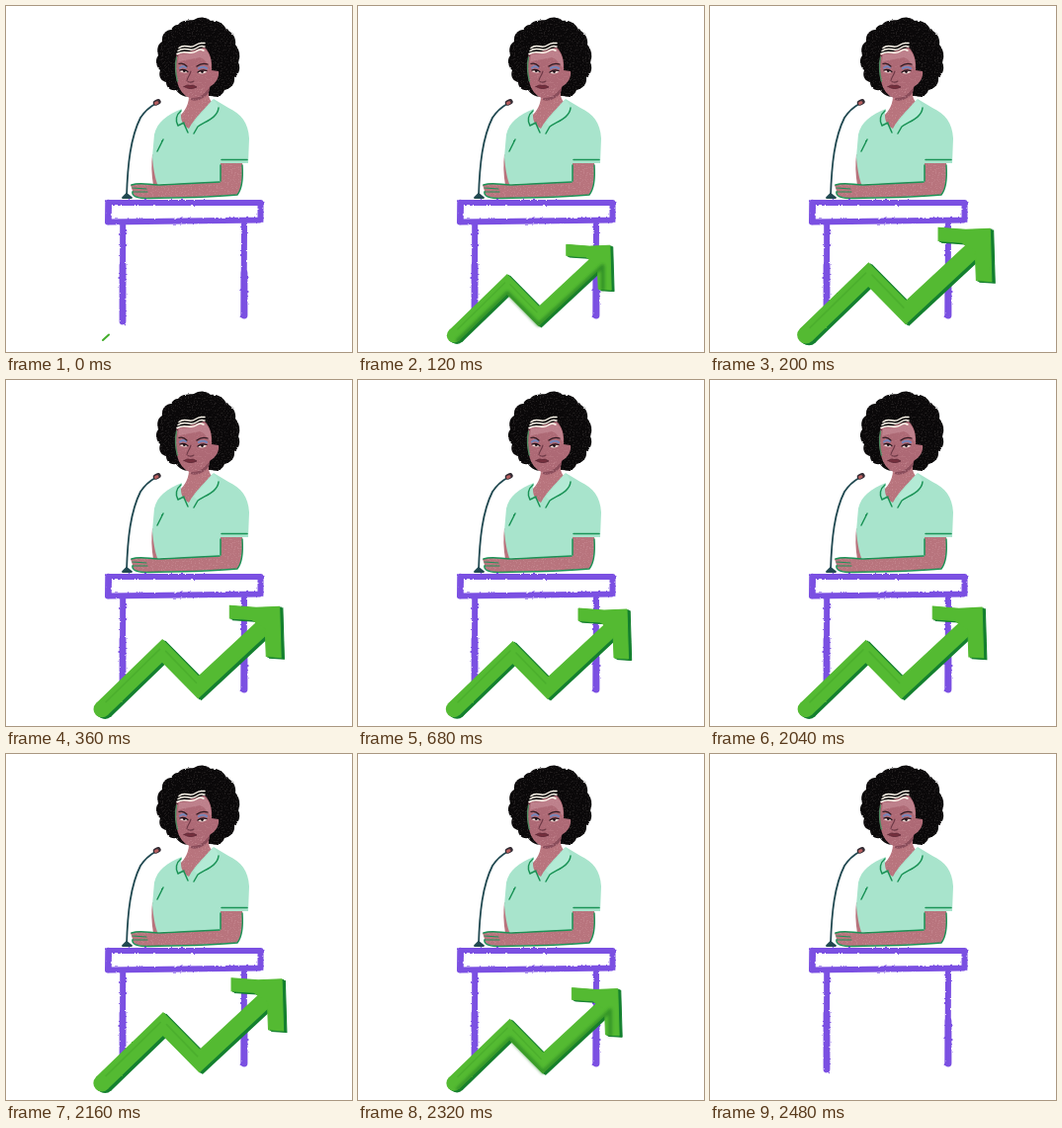
An HTML page that plays this animation: 350x350 px, repeating every 2.68 s.

```html
<!DOCTYPE html>
<html lang="en">
<head>
<meta charset="utf-8">
<title>Speaker with rising arrow</title>
<style>
html, body { margin: 0; width: 100%; height: 100%; overflow: hidden; background: #fff; }
svg { display: block; width: 100%; height: 100%; }
.line { fill: none; stroke-linecap: round; stroke-linejoin: round; }
</style>
</head>
<body>
<svg viewBox="0 0 350 350">
  <defs>
    <filter id="rough" filterUnits="userSpaceOnUse" x="0" y="0" width="350" height="350" color-interpolation-filters="sRGB">
      <feTurbulence type="fractalNoise" baseFrequency=".3" numOctaves="2" seed="4" result="n"/>
      <feDisplacementMap in="SourceGraphic" in2="n" scale="2.4" xChannelSelector="R" yChannelSelector="G"/>
    </filter>
    <filter id="soft" filterUnits="userSpaceOnUse" x="0" y="0" width="350" height="350" color-interpolation-filters="sRGB">
      <feTurbulence type="fractalNoise" baseFrequency=".25" numOctaves="2" seed="9" result="n"/>
      <feDisplacementMap in="SourceGraphic" in2="n" scale="1.4" xChannelSelector="R" yChannelSelector="G"/>
    </filter>
    <!-- keeps only scattered specks of the shape it is applied to -->
    <filter id="grain" filterUnits="userSpaceOnUse" x="0" y="0" width="350" height="350" color-interpolation-filters="sRGB">
      <feTurbulence type="fractalNoise" baseFrequency=".7" numOctaves="2" seed="2"/>
      <feColorMatrix values="0 0 0 0 0  0 0 0 0 0  0 0 0 0 0  7 0 0 0 -3.9" result="n"/>
      <feComposite in="SourceGraphic" in2="n" operator="in"/>
    </filter>
    <filter id="blur" filterUnits="userSpaceOnUse" x="60" y="200" width="260" height="150"><feGaussianBlur stdDeviation="1.8"/></filter>
    <path id="hair" d="M174 19C179 13 186 15 190 14C196 10 203 11 207 15C215 14 221 19 223 24C230 27 233 33 232 39C237 45 237 52 235 57C238 63 235 70 231 72C232 80 226 84 221 85C219 91 213 93 208 91L186 91C180 93 175 89 172 85C166 86 162 82 162 77C156 76 154 70 156 65C151 60 151 54 154 50C152 44 154 38 158 36C157 29 162 24 167 24C168 21 171 19 174 19Z"/>
    <path id="neck" d="M185 86L206 82C204 90 205 94 209 98L186 126C181 124 176 119 175 112C181 106 186 100 185 86Z"/>
    <path id="face" d="M173 48C171 57 171 68 173 76C175 85 180 91 186 93C194 95 202 89 207 81C213 78 216 71 215 66L208 65C209 55 206 46 201 42C191 44 181 48 173 48Z"/>
    <path id="arm" d="M217 158H239C240 174 239 186 234 191C205 193 165 194 140 194C131 194 127 191 128 187L126 181C135 178 145 181 155 181L216 177Z"/>
  </defs>

  <use href="#hair" fill="#0a0809" filter="url(#rough)"/>
  <use href="#hair" fill="#453f3f" filter="url(#grain)" opacity=".4"/>

  <g filter="url(#soft)">
    <g fill="#b8747d">
      <use href="#neck"/>
      <use href="#face" fill="#ad6975"/>
      <path d="M148 150L153 153V181H149C147 170 147 160 148 150Z"/>
      <use href="#arm"/>
    </g>
    <path d="M187 93C195 94 202 88 206 82L205 88C199 95 192 97 187 95Z" fill="#8a4d5b"/>
    <path d="M175 49C185 49 194 46 200 43C207 48 208 56 207 63C203 57 200 53 196 52C188 54 181 54 174 57Z" fill="#c9909a" opacity=".6"/>
    <path d="M172.5 52C171 60 171.5 69 173.5 76" class="line" stroke="#4d8a60" stroke-width="1.4"/>
  </g>
  <g fill="#d39aa2" filter="url(#grain)" opacity=".4">
    <use href="#neck"/><use href="#arm"/><use href="#face" opacity=".5"/>
  </g>

  <g class="line" stroke="#fff9ee" stroke-width="1.5">
    <path d="M175 42.5C181 37 185 44 191 40S197 38 201 37.5"/>
    <path d="M174 45.5C181 40 186 47 192 43S198 41 201 41"/>
    <path d="M173 48.5C181 43.5 186 50 192 46S198 45 200 45"/>
  </g>
  <g class="line">
    <path d="M176 62.5Q179 60 182 62M195 63Q199 60.5 203 63" stroke="#7885b8" stroke-width="2.2"/>
    <path d="M175 58.5Q179 57 183 61M193 61Q198 57 204 59" stroke="#321a22" stroke-width="1.3"/>
    <path d="M177 66Q179 67 183 66.5M195 67Q198 68.5 202 66.5" stroke="#eeded9" stroke-width="1.5"/>
    <path d="M176 65Q180 63 184 66.5M194 67Q198 63.5 203 65.5" stroke="#21131a" stroke-width="1.2"/>
    <path d="M187 66C186 70 183 73 183 75.5M184 76.5Q187 78 190 76" stroke="#6d3946" stroke-width="1.1"/>
    <path d="M180 81.5Q184 79 186 80.5Q189 79 193 82Q186 85.5 180 81.5Z" fill="#742f3d" stroke="#5c2735" stroke-width=".8"/>
  </g>
  <circle cx="180.3" cy="65.8" r="1.3" fill="#1c1017"/>
  <circle cx="198.5" cy="66.6" r="1.3" fill="#1c1017"/>

  <g filter="url(#soft)">
    <path d="M178 104C163 110 153 117 150 130L148 153C149 165 151 174 153 180L217 178V159H245L246 134C245 118 238 109 225 103L210 94L206 98C199 106 191 113 185 124C179 121 175 115 178 104Z" fill="#a8e4cc"/>
    <path d="M209 95C213 97 216 101 214 106C210 114 201 117 194 122L190 118C196 110 202 104 209 95Z" fill="#b3ead5"/>
    <g class="line" stroke="#1a9356" stroke-width="1.5">
      <path d="M177 106C172 110 171 116 174 121L180 118M180 119L184 128M215 103C214 113 203 116 194 122L190 129"/>
      <path d="M153 147L159 135M218 155.5H244M217 161V177"/>
      <path d="M127 181C136 178 145 181 155 181L216 178" stroke-width="1.6"/>
      <path d="M239 161C240 175 238 186 234 191C205 194 165 194 140 194.5C132 194 127 192 128 188" stroke-width="1.4"/>
      <path d="M128 184L142 185M128 188L143 188" stroke-width="1.1"/>
    </g>
  </g>

  <g class="line" stroke="#214951" stroke-width="1.8" filter="url(#soft)">
    <path d="M122 193C123 160 126 133 136 113Q142 104 151 99"/>
    <path d="M118 194L122 190L127 194Z" fill="#214951"/>
    <path d="M151.5 98L154 96.8" stroke="#352c34" stroke-width="5.4"/>
    <path d="M151.5 98.4L153 97.7" stroke="#b85f60" stroke-width="3"/>
  </g>

  <g class="line" stroke="#7b50e2" filter="url(#rough)">
    <path d="M118.2 221L118 319M241 221L240.5 313" stroke-width="6"/>
    <path d="M118 262V319M241 270V313" stroke-width="6.8"/>
    <path d="M104 199L257.5 199L257.5 216.5L103 218.5Z" fill="#fff" stroke-width="6"/>
    <path d="M103.5 199V218" stroke-width="6.5"/>
  </g>

  <g id="arrow">
    <g filter="url(#soft)">
      <g fill="#14802f" stroke="#14802f">
        <use href="#shape" transform="translate(1.6 .8)"/>
        <use href="#shape" transform="translate(3.2 1.6)"/>
      </g>
      <g fill="#54ba32" stroke="#54ba32">
        <g id="shape">
          <path d="M97 333L156.5 275.5L192 311.5L264 244.5" fill="none" stroke-width="16.4" stroke-miterlimit="4"/>
          <circle cx="97" cy="333" r="8.2" stroke="none"/>
          <path d="M223 231L249 233L272 232L273.5 282L259 281L258 254L245 245L223 243.5Z" stroke-width="1"/>
        </g>
      </g>
      <path d="M101 326L154 274M160 276L190 307" class="line" stroke="#47a92a" stroke-width="1.6" opacity=".6"/>
    </g>
    <path id="bevel" d="M101 339L157 285L192 321L264 255V281" class="line" stroke="#237f20" stroke-width="4" filter="url(#blur)"/>
  </g>
  <path id="spark" d="M98 338L104 332.5" class="line" stroke="#43ad2b" stroke-width="2"/>
</svg>

<script>
const LOOP = 2680, STEP = 40, RISE = 200, SETTLE = 680, EXIT_END = 2452;
const PEAK = 1.065, START = 0.04, ANCHOR = [99, 335];
const [arrow, bevel, spark] = ["arrow", "bevel", "spark"].map(id => document.getElementById(id));

// Quick growth past full size, then a slow return to it.
function sizeAt(t) {
  if (t < RISE) return PEAK - (PEAK - START) * (1 - t / RISE) ** 2;
  if (t < SETTLE) return 1 + (PEAK - 1) * (1 - (t - RISE) / (SETTLE - RISE)) ** 2.2;
  return 1;
}

function draw(time) {
  const now = Math.floor((time % LOOP) / STEP) * STEP;
  const t = Math.min(now, EXIT_END - now);
  const [x, y] = ANCHOR;
  arrow.style.display = now > 0 && t >= 0 ? "" : "none";
  spark.style.display = now === 0 ? "" : "none";
  arrow.setAttribute("transform", `translate(${x} ${y}) scale(${sizeAt(Math.max(t, 0))}) translate(${-x} ${-y})`);
  bevel.setAttribute("opacity", Math.max(0, Math.min(0.75, (RISE - t) / 110)));
}

const begin = performance.now();
function tick() {
  draw(performance.now() - begin);
  requestAnimationFrame(tick);
}
tick();
</script>
</body>
</html>
```
